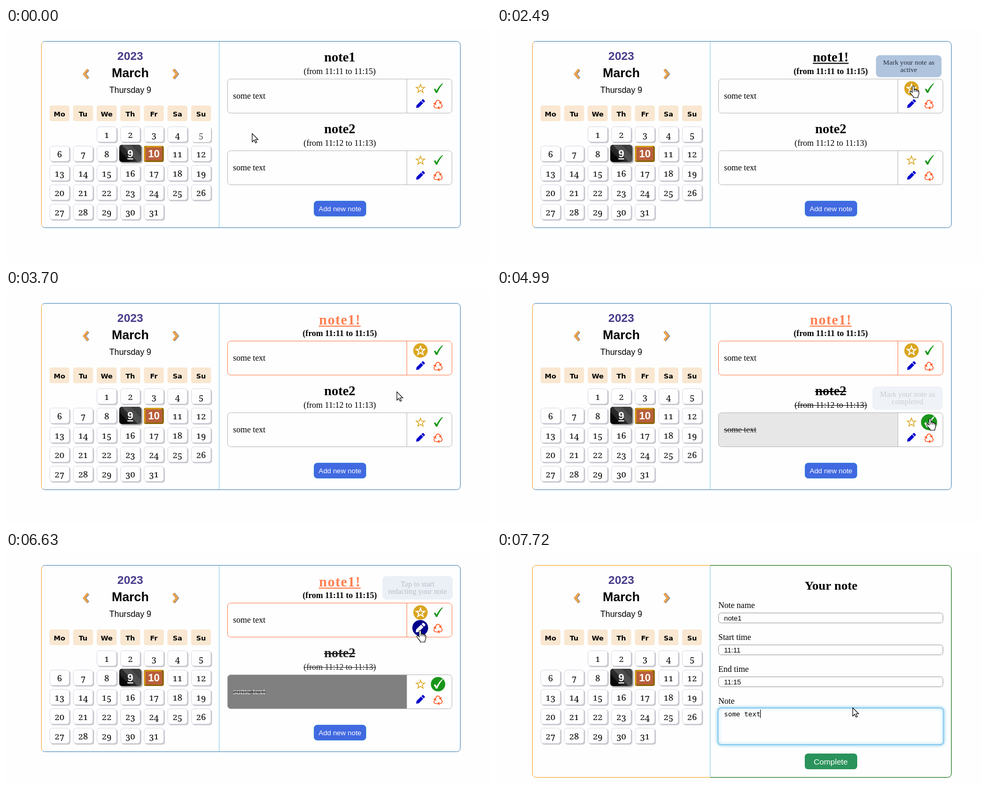
Recreate the animation shown at these times as an HTML page with a canvas. Size 925 px wide and 447 px high, loop 8 s.

```html
<!DOCTYPE html>
<html lang="en">
<head>
<meta charset="utf-8">
<title>Calendar notes</title>
<style>
html, body { margin: 0; width: 100%; height: 100%; overflow: hidden; background: #fefefe; }
canvas { display: block; }
</style>
</head>
<body>
<canvas id="stage" width="925" height="447"></canvas>
<script>
const ctx = document.getElementById('stage').getContext('2d');
const LOOP = 8000;
const SANS = '"Liberation Sans", Arial, sans-serif';
const SERIF = '"Liberation Serif", "Times New Roman", serif';
const DIGITS = '"Noto Serif", serif';
const HEADS = '"DejaVu Sans", sans-serif';
const MONO = '"DejaVu Sans Mono", monospace';

// Moments of the story
const ACTIVATE = 2400, COMPLETE = 4810, EDIT = 6810, FOCUS = 7540;

const BLACK = [0, 0, 0], WHITE = [254, 254, 254], CORAL = [255, 127, 80],
  LINE = [184, 184, 184], GRAY = [128, 128, 128];

const clamp = v => Math.max(0, Math.min(1, v));
const ramp = (t, a, b) => clamp((t - a) / (b - a));
const smooth = k => k * k * (3 - 2 * k);
const mix = (a, b, k) => `rgb(${a.map((v, i) => Math.round(v + (b[i] - v) * k)).join()})`;

function text(s, x, y, font, color = '#000', align = 'left', spacing = 0) {
  ctx.font = font;
  ctx.fillStyle = color;
  ctx.textAlign = align;
  ctx.letterSpacing = spacing + 'px';
  ctx.fillText(s, x, y);
  const w = ctx.measureText(s).width;
  ctx.letterSpacing = '0px';
  return w;
}

function box(x, y, w, h, r, fill, stroke, line = 1) {
  ctx.beginPath();
  ctx.roundRect(x, y, w, h, r);
  if (fill) { ctx.fillStyle = fill; ctx.fill(); }
  if (stroke) { ctx.strokeStyle = stroke; ctx.lineWidth = line; ctx.stroke(); }
}

function bar(x, y, w, h, color) {
  ctx.fillStyle = color;
  ctx.fillRect(x, y, w, h);
}

/* Calendar */

// Old-style figures: 0-2 are low, 3 4 5 7 9 hang below the line
function figures(n, cx, base) {
  const s = String(n), w = 9.2;
  [...s].forEach((d, i) => {
    const x = cx + (i - (s.length - 1) / 2) * w;
    ctx.save();
    ctx.translate(x, base + ('34579'.includes(d) ? 3 : 0));
    if (d < 3) ctx.scale(1, 0.84);
    text(d, 0, 0, '16.5px ' + DIGITS, '#000', 'center');
    ctx.restore();
  });
}

function today(x, y) {
  ctx.save();
  ctx.shadowColor = '#888';
  ctx.shadowBlur = 3;
  ctx.shadowOffsetX = ctx.shadowOffsetY = 2;
  const g = ctx.createLinearGradient(x, y + 33, x + 38, y - 2);
  [[0, '#000'], [.3, '#0a0a0a'], [.31, '#222'], [.5, '#2c2c2c'], [.51, '#555'],
    [.75, '#4a4a4a'], [.76, '#3a3a3a'], [1, '#444']].forEach(s => g.addColorStop(...s));
  box(x, y, 42, 33, 5, g);
  ctx.restore();
  text('9', x + 21, y + 24, 'bold 20px ' + SANS, '#fff', 'center');
  bar(x + 15.5, y + 26, 11, 2, '#fff');
}

function picked(x, y) {
  box(x, y, 38, 31, 4, '#8b6508');
  ctx.beginPath();
  ctx.moveTo(x + 4, y);
  ctx.lineTo(x + 36, y);
  ctx.lineTo(x + 4, y + 29);
  ctx.lineTo(x, y + 28);
  ctx.lineTo(x, y + 4);
  ctx.fillStyle = '#d29a16';
  ctx.fill();
  bar(x + 3, y + 3, 32, 25, '#b95f3b');
  text('10', x + 19, y + 22, 'bold 20px ' + SANS, '#fff', 'center');
}

function chevron(x, dir) {
  const path = (ox, oy) => {
    ctx.beginPath();
    ctx.moveTo(x + dir * 4 + ox, 79.5 + oy);
    ctx.lineTo(x - dir * 3 + ox, 88 + oy);
    ctx.lineTo(x + dir * 4 + ox, 96.5 + oy);
  };
  ctx.lineWidth = 5.5;
  ctx.strokeStyle = '#8d8d96';
  path(.8, 0);
  ctx.stroke();
  ctx.lineWidth = 3.6;
  ctx.strokeStyle = '#f4a443';
  path(0, -.3);
  ctx.stroke();
}

function calendar(t) {
  text('2023', 237, 61, 'bold 22.2px ' + SANS, '#483d8b', 'center');
  text('March', 237, 94, 'bold 24px ' + SANS, '#000', 'center');
  text('Thursday 9', 237, 124, '16px ' + SANS, '#000', 'center');
  chevron(152, 1);
  chevron(323, -1);
  ['Mo', 'Tu', 'We', 'Th', 'Fr', 'Sa', 'Su'].forEach((d, i) => {
    const x = 83 + i * 45;
    box(x, 148, 38, 30, 4, '#f9e7d1');
    text(d, x + 19, 169, 'bold 13px ' + HEADS, '#000', 'center');
  });
  for (let n = 1; n <= 31; n++) {
    const x = 83 + (n + 1) % 7 * 45, y = 188 + Math.floor((n + 1) / 7) * 37;
    if (n === 9) { today(x - 2, y - 2); continue; }
    if (n === 10) { picked(x, y); continue; }
    const fading = n === 5 && t < 80;
    box(x + 2, y + 2, 38, 30, 5, '#c8c8ce');
    box(x + .5, y + .5, 37, 29, 5, '#fefefe', fading ? '#fefefe' : '#d9d9e6');
    ctx.globalAlpha = fading ? .65 : 1;
    figures(n, x + 19, y + 22);
    ctx.globalAlpha = 1;
  }
}

/* Icons, drawn around their centre */

const PENCIL = new Path2D('M-11 0L-7-3H5V3H-7ZM6.3-3h3q1 0 1 1v4q0 1-1 1h-3z');
const CHECK = new Path2D('M-8 1.5L-5.5 0L-2.8 4Q2-5 8.3-10L9.2-9Q3-2-1.5 8.6L-4 8.6Z');
const ARROWS = new Path2D('M-6.2-2L-2-8.2H1.8L5-3.2M6-6.4L5.2-2.8L1.6-3.6');

const glyphs = {
  star() {
    ctx.beginPath();
    for (let i = 0; i < 10; i++) {
      const r = i % 2 ? 3.5 : 8.6, a = i * Math.PI / 5 - Math.PI / 2;
      ctx.lineTo(r * Math.cos(a), r * Math.sin(a) + .6);
    }
    ctx.closePath();
    ctx.stroke();
  },
  check() { ctx.fill(CHECK); },
  pencil() {
    ctx.rotate(-Math.PI / 4);
    ctx.fill(PENCIL);
  },
  recycle() {
    ctx.translate(0, 1.5);
    for (let i = 0; i < 3; i++) {
      ctx.stroke(ARROWS);
      ctx.rotate(Math.PI * 2 / 3);
    }
  }
};

function icon(name, x, y, color, disc = 0, scale = 1, discColor = color) {
  ctx.save();
  ctx.translate(x, y);
  ctx.scale(scale, scale);
  if (disc > 0) {
    ctx.globalAlpha = disc;
    ctx.beginPath();
    ctx.arc(0, 0, 13.7, 0, 7);
    ctx.fillStyle = discColor;
    ctx.fill();
    ctx.globalAlpha = 1;
  }
  ctx.fillStyle = ctx.strokeStyle = disc > .5 ? '#fff' : color;
  ctx.lineWidth = disc > .5 && name === 'star' ? 1.9 : 1.4;
  glyphs[name]();
  ctx.restore();
}

/* Notes */

function noteBox(y, fill, edge) {
  box(422.5, y + .5, 428, 65, 6, '#fefefe');
  ctx.save();
  ctx.beginPath();
  ctx.rect(422, y, 342, 66);
  ctx.clip();
  box(422.5, y + .5, 428, 65, 6, fill);
  ctx.restore();
  box(422.5, y + .5, 428, 65, 6, null, edge);
  bar(764, y + 1, 1, 64, edge);
}

function firstNote(t, hover) {
  const on = t >= ACTIVATE, k = smooth(ramp(t, ACTIVATE + 90, ACTIVATE + 900));
  const color = mix(BLACK, CORAL, k), size = 25.6 + k * 1.4, base = 64 + k * 1.5;
  const w = text(on ? 'note1!' : 'note1', 636.5 + k * .5, base, `bold ${size}px ${SERIF}`, color, 'center', k * 1.3);
  if (on) bar(636.5 - w / 2, base + 2.5, w, 2, color);
  text('(from 11:11 to 11:15)', 636.5, 88, (on ? 'bold ' : '') + '16px ' + SERIF, '#000', 'center');
  noteBox(97, '#fefefe', mix(LINE, CORAL, k));
  text('some text', 433, 135, '16px ' + SERIF);
  icon('star', 790.5, 115.5, '#daa520', on ? 1 : hover.star, 1 + .12 * hover.star);
  icon('check', 824, 115.5, '#1a961a');
  icon('pencil', 790, 145, '#0000cd', hover.pencil, 1 + .1 * hover.pencil, hover.pencil ? '#00008b' : '#0000cd');
  icon('recycle', 824, 145, '#ff4a12');
}

function secondNote(t, hover) {
  const done = t >= COMPLETE, k = ramp(t, COMPLETE, COMPLETE + 1000);
  const ink = mix(BLACK, [34, 34, 34], k);
  const w = text('note2', 636.5, 201, 'bold 25.6px ' + SERIF, ink, 'center');
  const v = text('(from 11:12 to 11:13)', 636.5, 225, '16px ' + SERIF, ink, 'center');
  noteBox(234, done ? mix(WHITE, GRAY, k) : '#fefefe', mix(LINE, LINE, 0));
  const u = text('some text', 433, 272, '16px ' + SERIF, mix(BLACK, [225, 225, 225], k));
  if (done) {
    bar(636.5 - w / 2, 193, w, 2, ink);
    bar(636.5 - v / 2, 220, v, 1, ink);
    bar(433, 267, u, 1, '#000');
  }
  icon('star', 790.5, 252.5, '#daa520');
  icon('check', 824, 252.5, '#1a961a', done ? 1 : hover.check, 1 + .12 * hover.check);
  icon('pencil', 790, 282, '#0000cd');
  icon('recycle', 824, 282, '#ff4a12');
}

function tip(lines, x, y, alpha, scale = 1) {
  if (alpha <= 0) return;
  ctx.save();
  ctx.globalAlpha = alpha;
  ctx.translate(x, y);
  ctx.scale(scale, scale);
  box(-67, -22.5, 134, 45, 8, '#b0c4de');
  lines.forEach((s, i) => text(s, 0, -3 + i * 14.6, '14.4px ' + SERIF, '#26303c', 'center'));
  ctx.restore();
}

function tips(t) {
  const press = ramp(t, 2370, 2420);
  tip(['Mark your note as', 'active'], 785.3, 68.5 + press * 4.5,
    ramp(t, 1460, 2330) * (1 - ramp(t, 2560, 3050)), 1 - press * .067);
  tip(['Mark your note as', 'completed'], 783, 206.5,
    ramp(t, 4780, 5000) * .2 * (1 - ramp(t, 5050, 5450)));
  tip(['Tap to start', 'redacting your note'], 785, 68.5, ramp(t, 6450, 7150));
}

function list(t) {
  const over = (a, b) => ramp(t, a, a + 120) * (1 - ramp(t, b, b + 120));
  const hover = { star: over(890, 2340), check: over(4340, 5400), pencil: over(6080, EDIT) };
  firstNote(t, hover);
  secondNote(t, hover);
  box(587.5, 330.5, 99, 29, 6, '#4169e1', '#3a86d8');
  text('Add new note', 637, 350, '13.33px ' + SANS, '#fff', 'center');
  tips(t);
}

/* Editing form */

function form(t) {
  text('Your note', 637, 72, 'bold 24px ' + SERIF, '#000', 'center');
  [['Note name', 'note1'], ['Start time', '11:11'], ['End time', '11:15']].forEach(([label, value], i) => {
    const y = 107 + i * 61;
    text(label, 422, y, '16px ' + SERIF);
    box(422.5, y + 9.5, 428, 19, 5, '#fefefe', '#9a9a9a');
    text(value, 433, y + 24, '13.33px ' + SANS);
  });
  text('Note', 422, 290, '16px ' + SERIF);
  if (t >= FOCUS) {
    ctx.save();
    ctx.shadowColor = '#87ceeb';
    ctx.shadowBlur = 6;
    box(421.5, 298, 430, 70, 6, '#fefefe', '#87c8ec', 2);
    ctx.restore();
    bar(502, 301, 1, 16, '#000');
  } else {
    box(422.5, 298.5, 428, 69, 6, '#fefefe', '#9a9a9a');
  }
  text('some text', 433, 314, '12.8px ' + MONO);
  box(587, 385, 100, 30, 6, '#2a935b');
  text('Complete', 636.5, 406, '15.2px ' + SANS, '#fff', 'center');
}

function card(editing) {
  const bottom = editing ? 431 : 382, h = bottom - 26;
  const part = (x, w, color) => {
    ctx.save();
    ctx.beginPath();
    ctx.rect(x, 20, w, 420);
    ctx.clip();
    box(67.5, 25.5, 799, h, 7, null, color);
    ctx.restore();
  };
  part(60, editing ? 347 : 10, editing ? '#f5a01a' : '#f0a030');
  part(editing ? 407 : 70, 800, editing ? '#006400' : '#4682b4');
  bar(406, 26, 1, h - 1, '#87ceeb');
}

/* Pointer */

const ARROW = new Path2D('M.5 .5V16.5L4.2 13L6.8 18.6L9.3 17.5L6.8 12H11.8Z');
const HAND = new Path2D('M-1 2Q.7-.6 2.6 2V8Q4.6 6.6 6.2 8.4Q8.2 7.6 9.4 9.4Q11.6 9.2 11.7 12V16Q11.2 19 10 20.4V23H1V21Q-3 17-5 13.4Q-6 10.8-4.2 10.6Q-2.6 10.6-1 13ZM2.6 8V12M6.2 8.4V12M9.4 9.4V12.5');
const HAND_SPANS = [[820, 2800], [4360, 5430], [5960, EDIT]];
const STOPS = [
  [0, 469, 201], [80, 469, 201], [860, 793, 112], [1040, 793, 110], [2760, 793, 110],
  [3180, 540, 128], [3330, 496, 150], [3700, 745, 194], [3960, 783, 197], [4020, 783, 198],
  [4440, 825, 245], [5400, 825, 245], [5600, 812, 228], [6120, 789, 149], [6830, 789, 149],
  [7280, 680, 295], [7379, 680, 295], [7380, 675, 292], [7719, 675, 292], [7720, 678, 297], [LOOP, 678, 297]
];

function pointer(t) {
  const i = STOPS.findIndex(s => s[0] > t);
  const [ta, xa, ya] = STOPS[i - 1], [tb, xb, yb] = STOPS[i];
  const k = smooth(ramp(t, ta, tb));
  const shape = HAND_SPANS.some(([a, b]) => t >= a && t < b) ? HAND : ARROW;
  ctx.save();
  ctx.translate(Math.round(xa + (xb - xa) * k), Math.round(ya + (yb - ya) * k));
  ctx.fillStyle = '#fff';
  ctx.strokeStyle = '#000';
  ctx.lineWidth = 1.1;
  ctx.fill(shape);
  ctx.stroke(shape);
  ctx.restore();
}

function draw() {
  const t = performance.now() % LOOP, editing = t >= EDIT;
  bar(0, 0, 925, 447, '#fefefe');
  card(editing);
  calendar(t);
  (editing ? form : list)(t);
  pointer(t);
  requestAnimationFrame(draw);
}
draw();
</script>
</body>
</html>
```
